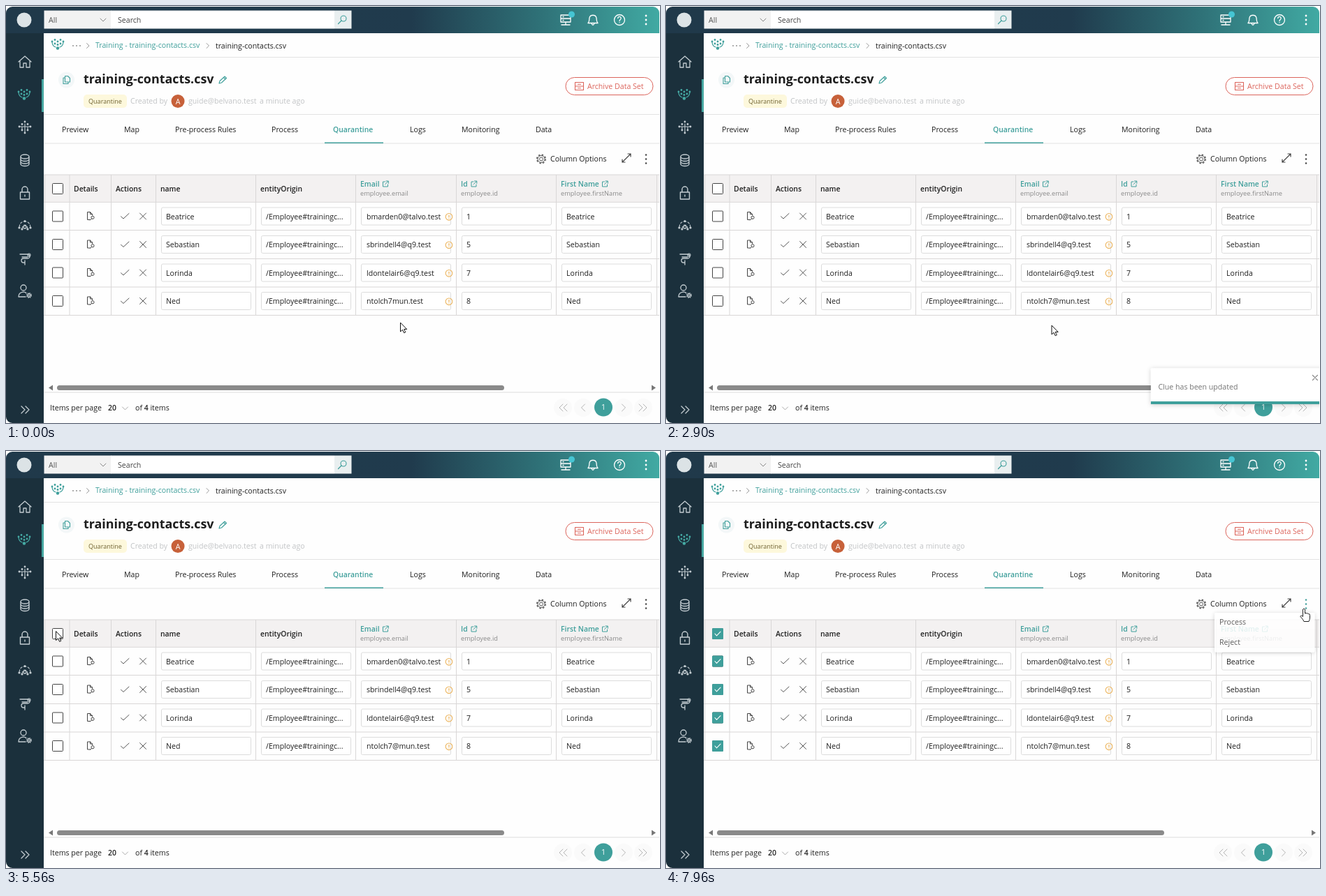
Recreate the animation shown at these times as an HTML page. Size 936 by 598 pixels, loop 8000 ms.

```html
<!DOCTYPE html>
<html lang="en">
<head>
<meta charset="utf-8">
<title>Quarantine</title>
<style>
  html, body { margin: 0; width: 100%; height: 100%; overflow: hidden; background: #fff; }
  svg { display: block; width: 936px; height: 598px; }
  text { font: 10.6px "Open Sans", "Noto Sans", sans-serif; white-space: pre; }
  .b { font-weight: 600; font-size: 10.4px; }
  .line { fill: none; stroke-linecap: round; stroke-linejoin: round; }
</style>
</head>
<body>
<svg id="stage" viewBox="0 0 936 598"></svg>
<script>
const TEAL = '#3f9f9b', DARK = '#444', INK = '#1f1f1f', SIDE = '#c3ccd1', RED = '#dc655c', PALE = '#c2c4c6';
const ROWS = [301.5, 342, 382.5, 423];

// --- drawing helpers, each returns markup ---
const text = (x, y, s, fill = INK, extra = '') =>
  `<text x="${x}" y="${y}" style="fill:${fill};${extra}">${s}</text>`;
const bold = (x, y, s, fill = INK) => `<text class="b" x="${x}" y="${y}" style="fill:${fill}">${s}</text>`;
const rect = (x, y, w, h, fill, extra = '') =>
  `<rect x="${x}" y="${y}" width="${w}" height="${h}" fill="${fill}" ${extra}/>`;
const dot = (x, y, r, fill, extra = '') => `<circle cx="${x}" cy="${y}" r="${r}" fill="${fill}" ${extra}/>`;
const ring = (x, y, r, c, w = 1.1) => dot(x, y, r, 'none', `stroke="${c}" stroke-width="${w}"`);
const icon = (x, y, d, c = DARK, w = 1.1, extra = '') =>
  `<path class="line" transform="translate(${x} ${y})" d="${d}" stroke="${c}" stroke-width="${w}" ${extra}/>`;
const hline = (y, c = '#e3e3e3') => rect(54, y, 882, 1, c);
const field = (x, y) => rect(x + .5, y - 12.5, 128, 25, '#fff', 'rx="2" stroke="#dcdcdc"');
const group = (id, inner, extra = '') => `<g id="${id}" ${extra}>${inner}</g>`;
const spots = (x, y, r, c, list) => list.map(([a, b]) => dot(x + a, y + b, r, c)).join('');

const tree = (x, y, c) =>
  icon(x, y, 'M-8-2Q-7.500 3.500-3 5M8-2Q7.500 3.500 3 5', c, 1.2) +
  spots(x, y, 1.4, c, [[-8, -3], [8, -3], [-4, -5.5], [4, -5.5], [0, -3], [-4, 0], [4, 0], [0, 1.5]]) +
  dot(x, y + 6.5, 2.2, c);
const dots = (x, y, c, r = 1.2) => spots(x, y, r, c, [[0, -6], [0, 0], [0, 6]]);
const link = (x, y) => icon(x, y, 'M-.5-3H-3.5V4H3.5V1M1-4H4.3V-.7M4-3.7L-.5 .8', TEAL, 1);
const gear = (x, y, r, c) => ring(x, y, r * .4, c, 1) + ring(x, y, r * .8, c, 1) +
  dot(x, y, r, 'none', `stroke="${c}" stroke-width="1.6" stroke-dasharray="${r * .4} ${r * .385}"`);

function header() {
  return rect(0, 0, 936, 39, 'url(#bar)') +
    dot(26, 20, 10.5, '#dce3e6') +
    rect(54.5, 6.5, 96, 26, '#f2f2f2') + rect(150, 6.5, 320, 26, '#fff') + rect(470, 6.5, 24.5, 26, '#e9eff0') +
    text(61, 23.5, 'All', '#555') + icon(139, 20, 'M-4-2L0 2L4-2', '#888', 1) +
    text(160, 23.5, 'Search', '#444') +
    ring(483, 18, 4, TEAL) + icon(480, 21, 'M0 0L-4.5 4.5', TEAL, 1.2) +
    icon(801, 19, 'M-7-6H7V-1H-7ZM-7-1H7V4H-7ZM0 4V8M-6 8H6M-4-3.5H-3M-4 1.5H-3', '#fff', 1.3) +
    dot(809.5, 12, 4.5, '#45c5d3') +
    icon(840, 20, 'M-7 4.5C-4.5 2-5.5-1-5-3C-4-8 4-8 5-3C5.5-1 4.5 2 7 4.5ZM-2 5Q0 9.5 2 5', '#fff', 1.3) +
    ring(878, 20, 7.5, '#fff', 1.3) + icon(878, 19, 'M-2.3-1.5C-2-4.5 2.5-4 2.2-1.3C2 .5 0 .5 0 2.5M0 4.6V4.7', '#fff', 1.3) +
    dots(916, 20, '#fff', 1.4);
}

function sidebar() {
  return rect(0, 39, 54, 559, '#1b303c') + rect(51, 105, 3, 47, '#45a7a1') +
    icon(27, 80, 'M-9 0L0-8L9 0M-7-1V8H-2V2H2V8H7V-1', SIDE, 1.3) +
    tree(26, 126, '#45aaa4') +
    icon(27, 174, 'M0-5V8M-7-1H7M-4 4V-1M4 4V-1', SIDE, 1.1) +
    spots(27, 174, 1.4, SIDE, [[-8, -1], [8, -1], [-4, 4], [4, 4], [0, -8], [-4, -4.5], [4, -4.5], [0, 8]]) +
    icon(27, 221, 'M-6-5A6 3 0 0 1 6-5A6 3 0 0 1-6-5V5.5A6 3 0 0 0 6 5.5V-5M-6-1.5A6 3 0 0 0 6-1.5M-6 2A6 3 0 0 0 6 2', SIDE, 1.4) +
    icon(27, 268, 'M-6.5-1H6.5V9H-6.5ZM-4-1V-5A4 4 0 0 1 4-5V-1M0 3V5', SIDE, 1.4) +
    icon(27, 315, 'M-8 2Q-7-6 0-6Q7-6 8 2M-4 4Q-3-1 0-1Q3-1 4 4', SIDE, 1.1, 'stroke-dasharray="3 2.5"') +
    spots(27, 315, 1.6, SIDE, [[-8, 3], [8, 3], [-4, 5], [4, 5], [0, -6.5]]) + ring(27, 317, 2, SIDE, 1.3) +
    icon(27, 362, 'M-7-6H4A3 3 0 0 1 4 0H-2A3 3 0 0 0-2 6H0M-4-2H4M0 3V9', SIDE, 1.3) + ring(33, 357, 2, SIDE) +
    ring(25, 404, 4, SIDE, 1.3) + icon(27, 409, 'M-9 8C-9 0 1 0 2 3M-9 8H1', SIDE, 1.3) + gear(33, 415, 3.2, SIDE) +
    icon(27, 579, 'M-5-5L0 0L-5 5M1-5L6 0L1 5', SIDE, 1.3);
}

function heading() {
  const tabs = [[80, 'Preview'], [169, 'Map'], [242, 'Pre-process Rules'], [380, 'Process'], [578, 'Logs'], [652, 'Monitoring'], [758, 'Data']];
  const crumb = x => icon(x, 57, 'M-2-3.5L1.5 0L-2 3.5', '#999', 1);
  return tree(74, 54, TEAL) + spots(101, 57, .9, '#888', [[-5, 0], [0, 0], [5, 0]]) +
    crumb(117.5) + text(128, 60, 'Training - training-contacts.csv', TEAL) +
    crumb(289) + text(300, 60.5, 'training-contacts.csv') +
    hline(73) +
    dot(86.5, 106, 11.5, '#f3f7f8') +
    icon(86.5, 106, 'M-2-5.5H2L5-2.5V3H-2ZM-2-3H-4.5V5.5H2.5V3', TEAL) +
    text(111, 110.5, 'training-contacts.csv', '#1d1d1d', 'font-size:17.9px;font-weight:700') +
    icon(310, 106, 'M-5 5L-4 1.5L3-5L5.5-2.5L-1.5 4ZM1.5-3.5L4-1', TEAL) +
    rect(111, 127, 62, 19, '#fdf8dc', 'rx="5"') + text(118, 140, 'Quarantine', '#6e6230', 'font-size:9.05px') +
    text(178, 140.3, 'Created by', PALE) + dot(246, 136.5, 9.5, '#c7613a') +
    text(246, 140.5, 'A', '#fff', 'text-anchor:middle') +
    text(261, 140.3, 'guide@belvano.test', PALE) + text(363, 140.3, 'a minute ago', PALE) +
    rect(801, 102.5, 125, 25, '#fff', `rx="12.5" stroke="${RED}"`) +
    icon(820.5, 115, 'M-6-5.5H6V5.5H-6ZM-6 0H6M-2-2.8H2M-2 2.8H2', RED) + text(832, 118.7, 'Archive Data Set', RED) +
    hline(155) + tabs.map(([x, s]) => text(x, 180.8, s)).join('') + bold(468, 180.8, 'Quarantine', TEAL) +
    hline(196.5) + rect(456, 195.5, 84, 1.5, TEAL) +
    gear(766, 219.5, 6.2, '#555') + text(779, 223.3, 'Column Options') +
    icon(888, 218, 'M-6 6L6-6M2-6H6V-2M-6 2V6H-2', DARK, 1.2) + group('more', dots(916, 219.5, 'currentColor'));
}

function table() {
  const linked = [[507, 'Email', 'employee.email', 543], [651, 'Id', 'employee.id', 669.5], [794, 'First Name', 'employee.firstName', 857]];
  const people = ['Beatrice', 'Sebastian', 'Lorinda', 'Ned'];
  const mails = ['bmarden0@talvo.test', 'sbrindell4@q9.test', 'ldontelair6@q9.test', '<tspan id="mail"></tspan>'];
  let s = rect(54, 242, 882, 39, '#f3f1f1');
  for (const y of [241.5, 280.8, 321, 362, 402.5, 443]) s += hline(y, '#d9d7d7');
  for (const x of [55, 90.5, 150, 214, 357, 500, 644, 787, 931]) s += rect(x, 242, 1, 202, '#d9d7d7');
  s += bold(97, 265.5, 'Details') + bold(157, 265.5, 'Actions') + bold(221, 265.5, 'name') + bold(364, 265.5, 'entityOrigin');
  for (const [x, name, path, lx] of linked)
    s += bold(x, 259.2, name, TEAL) + text(x, 271.8, path, '#8a8a8a', 'font-size:9.3px') + link(lx, 255);
  ROWS.forEach((y, i) => {
    const b = y + 4;
    s += icon(121, y, 'M-.5 5H-4.5V-6H-.5L2.500-3V-1.500M-.5-6V-3H2.500', DARK, 1) + ring(124, y + 1.8, 2.1, DARK, 1) +
      icon(122.500, y + 3.500, 'M0 0L-2 2', DARK, 1) +
      icon(170, y, 'M-5.500 .3L-2 3.500L6-4', DARK, .9) + icon(196, y, 'M-4.5-4.5L4.5 4.5M4.5-4.5L-4.5 4.5', DARK, .9) +
      [222, 365, 508, 652, 795].map(x => field(x, y)).join('') +
      text(229, b, people[i]) + text(372, b, '/Employee#trainingc...') + text(516, b, mails[i]) +
      text(659, b, [1, 5, 7, 8][i]) + text(802, b, people[i]);
  });
  s += rect(509, 411, 127.5, 24.5, 'none', `id="focus" stroke="${TEAL}" stroke-width="1.8" rx="1"`) + rect(563, 416, 1, 14, '#111', 'id="caret"');
  for (const y of ROWS) s += ring(634, y + .8, 4.8, '#ecb35a') + icon(634, y + .8, 'M0-2.3V.5M0 2.3V2.4', '#e8a94a');
  for (const y of [262, ...ROWS]) s += rect(66.5, y - 7.5, 15, 15, '#fff', 'stroke="#444" rx="1"');
  return s + group('checks', [262, ...ROWS].map(y =>
    rect(66, y - 8, 16, 16, TEAL, 'rx="1.5"') + icon(74, y, 'M-4 0L-1.5 2.8L4-2.8', '#fff')).join(''));
}

function footer() {
  const page = [[797, 'M0-5L-5 0L0 5M6-5L1 0L6 5'], [826, 'M2.5-5L-2.5 0L2.5 5'], [884, 'M-2.5-5L2.5 0L-2.5 5'], [912, 'M0-5L5 0L0 5M-6-5L-1 0L-6 5']];
  return rect(73, 544, 640, 7, '#8a8a8a', 'rx="3.5"') +
    '<path d="M61 547.5l6-4v8zM930 547.5l-6-4v8z" fill="#777"/>' + hline(553.5, '#ddd') +
    text(63, 580, 'Items per page') + bold(146, 580, '20') + icon(170.5, 577, 'M-4-2L0 2L4-2', '#aaa', 1) +
    text(185, 580, 'of <tspan class="b">4</tspan> items') +
    page.map(([x, d]) => dot(x, 576, 13, '#fafafa') + icon(x, 576, d, '#b4b4b4', 1)).join('') +
    dot(855, 575.5, 13, TEAL) + text(855, 579.3, '1', '#fff', 'text-anchor:middle');
}

const toastBox = rect(673, 519.5, 248, 51.5, '#fff', 'rx="1" filter="url(#shadow)"') +
  text(683.5, 549.5, 'Clue has been updated', '#757575', 'font:11.15px "Liberation Sans",Arial,sans-serif') +
  icon(908, 533, 'M-3.5-3.5L3.5 3.5M3.5-3.5L-3.5 3.5', '#8c8c8c', 1.2) + rect(673, 567, 248, 4, TEAL, 'id="progress"');
const menuBox = rect(785, 232, 143.5, 56.5, '#fff', 'rx="2" filter="url(#shadow)"') +
  text(792, 248.8, 'Process', '#444') + text(792, 277.5, 'Reject', '#444');

const pointers = group('cursor',
  '<path id="arrow" d="M0 0V13L3 10.3L5.2 14.8L7.3 13.8L5.2 9.5H9.2Z" fill="#fff" stroke="#111" stroke-linejoin="round"/>' +
  icon(0, 0, 'M-2.5-7Q0-7 0-5.5Q0-7 2.5-7M0-5.5V5.5M-2.5 7Q0 7 0 5.5Q0 7 2.5 7', '#222', 1, 'id="beam"') +
  '<path id="hand" d="M-1.5 1Q0-1 1.5 1V7Q3.3 5.5 4.3 7.2Q6 6 6.7 7.8Q8.5 7.2 8.5 9.5V13Q8.5 15.5 7 18.5H0Q-1 15.5-5 11.5Q-4.5 8.5-1.5 11.5Z" fill="#fff" stroke="#222" stroke-linejoin="round"/>');

const stage = document.getElementById('stage');
stage.innerHTML = `<defs>
  <linearGradient id="bar"><stop offset="0" stop-color="#20394a"/><stop offset=".62" stop-color="#203b4d"/>
    <stop offset=".82" stop-color="#2f7278"/><stop offset="1" stop-color="#41aaa3"/></linearGradient>
  <filter id="shadow" x="-10%" y="-30%" width="120%" height="160%"><feDropShadow dx="0" dy="1" stdDeviation="3" flood-opacity=".2"/></filter>
  <clipPath id="window"><rect y="1" width="935" height="597" rx="9"/></clipPath></defs>` +
  group('app', rect(0, 0, 936, 598, '#fefefe') + header() + sidebar() + heading() + table() + footer() +
    group('toast', toastBox) + group('menu', menuBox) + pointers, 'clip-path="url(#window)"');

// --- motion ---
const $ = id => document.getElementById(id);
const show = (id, on) => $(id).setAttribute('visibility', on ? 'visible' : 'hidden');
const clamp = (v, lo = 0, hi = 1) => Math.min(hi, Math.max(lo, v));
const smooth = u => u * u * (3 - 2 * u);
const easeOut = u => 1 - (1 - u) ** 3;
const between = (t, a, b) => t >= a && t < b;

// keys: [time, ...values]
function at(keys, t, ease) {
  let i = 0;
  while (i < keys.length - 2 && t >= keys[i + 1][0]) i++;
  const [a, b] = [keys[i], keys[i + 1]];
  const u = ease(clamp((t - a[0]) / (b[0] - a[0])));
  return a.slice(1).map((v, k) => v + (b[k + 1] - v) * u);
}

// the pointer is away from GONE to BACK
const GONE = 2925, BACK = 4800;
const EDIT = [[130, 564.5, 454], [560, 553, 424], [2130, 553, 424], [2330, 552, 458]];
const PICK = [[4930, 118.5, 212], [5600, 71, 259], [6830, 71, 259], [7600, 913, 226]];
const ENTER = [[0, 3000], [.6, -25], [.75, 10], [.9, -5], [1, 0]];
const LEAVE = [[0, 0], [.2, -20], [1, 2000]];
const TOAST_IN = 2585, TOAST_OUT = 4712;

function draw(t) {
  const [x, y] = at(t < BACK ? EDIT : PICK, t, smooth);
  $('cursor').setAttribute('transform', `translate(${x} ${y})`);
  const away = between(t, GONE, BACK), beam = t < GONE && y < 436, hand = t > 7560;
  show('beam', beam);
  show('hand', hand);
  show('arrow', !away && !beam && !hand);

  const typed = t >= 1360;
  $('mail').textContent = typed ? 'ntolch7@mun.test' : 'ntolch7mun.test';
  show('focus', between(t, 600, 2500));
  show('caret', between(t, 600, 1030) || between(t, 1360, 1760) || between(t, 2130, 2500));
  $('caret').setAttribute('x', typed ? 563 : 552.5);

  show('toast', between(t, TOAST_IN, TOAST_OUT + 700));
  const [shift] = t < TOAST_OUT ? at(ENTER, (t - TOAST_IN) / 700, easeOut) : at(LEAVE, (t - TOAST_OUT) / 700, easeOut);
  $('toast').setAttribute('transform', `translate(${shift} 0)`);
  $('progress').setAttribute('width', clamp((TOAST_OUT - t) * .152, 0, 248));

  $('checks').setAttribute('opacity', clamp((t - 5950) / 200));
  $('menu').setAttribute('opacity', clamp((t - 7760) / 235));
  $('more').setAttribute('color', hand ? TEAL : DARK);
}

const start = performance.now();
function tick() {
  draw((performance.now() - start) % 8000);
  requestAnimationFrame(tick);
}
tick();
</script>
</body>
</html>
```
